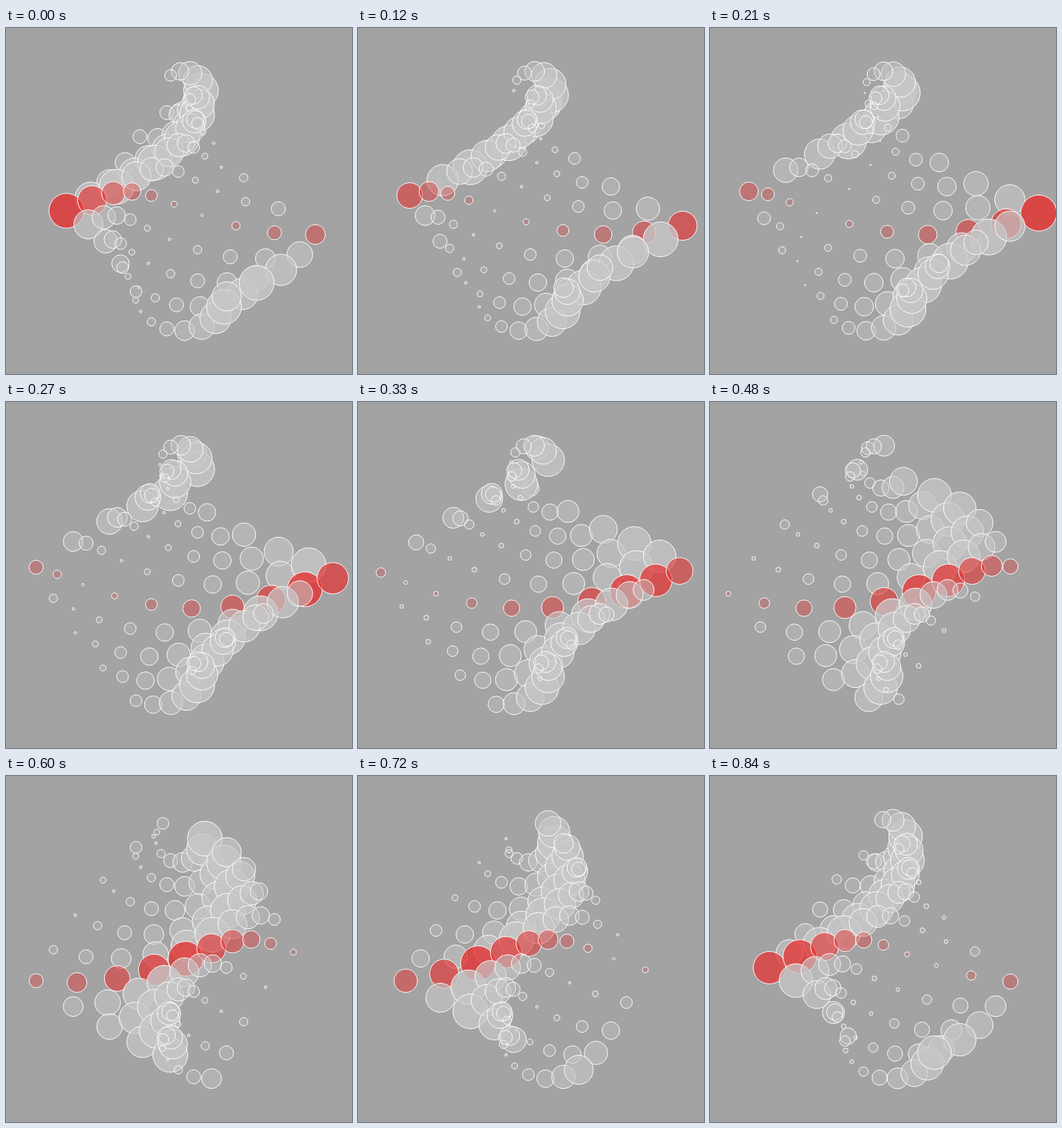
An HTML page that plays this animation: 500x500 px, repeating every 0.9 s.

```html
<!DOCTYPE html>
<html lang="en">
<head>
<meta charset="utf-8">
<title>Orbiting dots</title>
<style>
  html, body { margin: 0; width: 100%; height: 100%; overflow: hidden; background: #a3a3a3; }
  svg { display: block; width: 100vw; height: 100vh; }
  circle { stroke: #fff; stroke-width: 1; }
</style>
</head>
<body>
<svg id="stage" viewBox="0 0 500 500"></svg>
<script>
const TAU = Math.PI * 2;
const COUNT = 10;        // dots per row, and rows
const MID_ROW = 5;       // widest row, in red
const ORBIT = 31.25;
const STEPS = 30;        // steps per turn
const STEP_MS = 30;
const LAST_STEP = 28;    // held until the loop restarts

const stage = document.getElementById('stage');
const dots = [];

function addDot(row, col) {
  const half = 6.25 + 37.5 * (MID_ROW - Math.abs(row - MID_ROW));
  const el = document.createElementNS('http://www.w3.org/2000/svg', 'circle');
  el.setAttribute('fill', row === MID_ROW ? 'rgb(230,50,50)' : 'rgb(199,199,199)');
  stage.appendChild(el);
  // the very first dot runs a fifth of a turn ahead
  const lead = row + col === 0 ? TAU / 5 : 0;
  dots.push({
    el,
    x: 250 + half * (2 * col / (COUNT - 1) - 1),
    y: 93.75 + row * 312.5 / (COUNT - 1),
    phase: (col + row - MID_ROW) * TAU / 12 + lead
  });
}

for (let row = 0; row < COUNT; row++) {
  for (let col = 0; col < COUNT; col++) addDot(row, col);
}

function draw(ms) {
  const step = Math.min(Math.floor(ms / STEP_MS), LAST_STEP);
  const turn = (step + 0.5) / STEPS * TAU;
  for (const { el, x, y, phase } of dots) {
    const a = ((turn + phase) % TAU + TAU) % TAU;
    const size = Math.abs(a - Math.PI) / Math.PI;
    el.setAttribute('cx', (x + ORBIT * Math.cos(a)).toFixed(2));
    el.setAttribute('cy', (y - ORBIT * Math.sin(a)).toFixed(2));
    el.setAttribute('r', (1 + 25 * size).toFixed(2));
    el.setAttribute('fill-opacity', (0.18 + 0.64 * Math.pow(size, 1.5)).toFixed(3));
  }
}

const start = performance.now();
function tick() {
  draw((performance.now() - start) % (STEPS * STEP_MS));
  requestAnimationFrame(tick);
}
tick();
</script>
</body>
</html>
```
